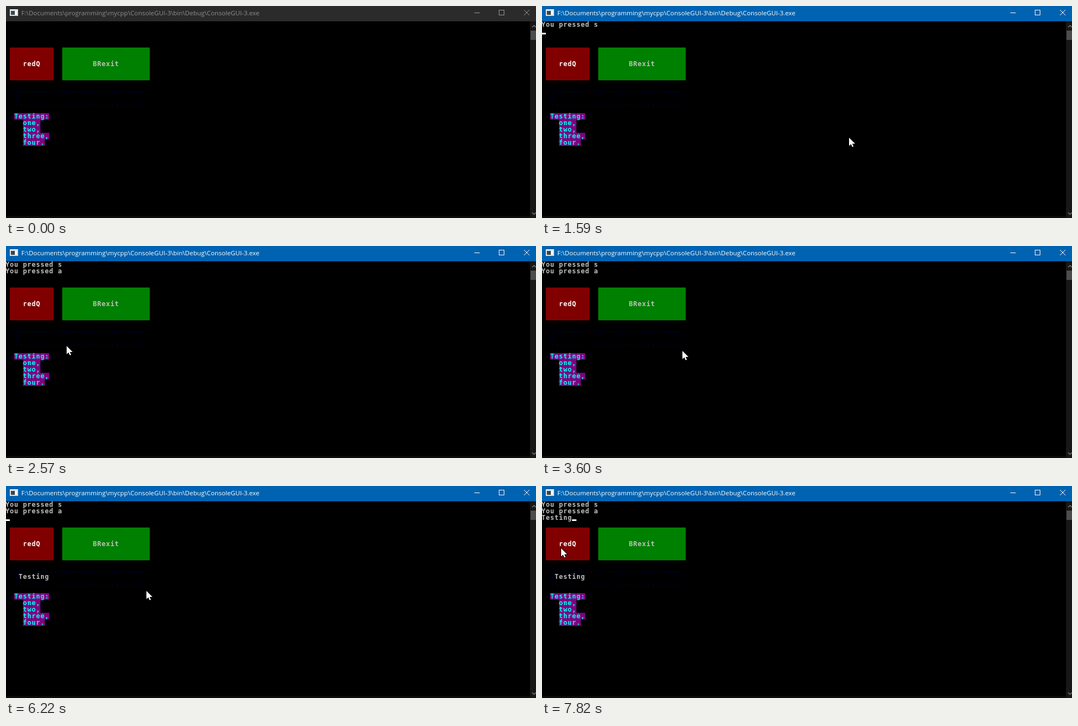
An HTML page with a canvas that plays this animation: 970x388 px, repeating every 8 s.

```html
<!DOCTYPE html>
<html lang="en">
<head>
<meta charset="utf-8">
<title>Console GUI</title>
<style>
html, body { margin: 0; width: 970px; height: 388px; overflow: hidden; background: #000; }
canvas { display: block; }
</style>
</head>
<body>
<canvas id="stage" width="970" height="388"></canvas>
<script>
const ctx = document.getElementById('stage').getContext('2d');
const LOOP = 8000;
const CELL_W = 8, CELL_H = 12;
const BLINK = 530;
const SILVER = '#c0c0c0';

const log = [
  { at: 860, text: 'You pressed s' },
  { at: 1980, text: 'You pressed a' },
  { at: 7300, text: 'Testing' }
];
const caretStart = 1440;
const typing = { from: 4700, step: 114, text: 'Testing' };

// Straight pointer moves: start, end, x, y reached
const enter = { x: 820, y: 343 };
const moves = [
  [80, 230, 597, 238], [390, 1270, 594, 238], [1440, 1590, 563, 241],
  [1590, 2170, 177, 223], [2290, 2570, 111, 183], [2570, 3070, 83, 175],
  [3410, 3600, 257, 192], [6260, 6440, 235, 202], [6440, 7000, 96, 142],
  [7060, 7460, 57, 131], [7770, 7820, 35, 114]
];

// Border dots wiped by the pointer: column, row, time
const wiped = [[11, 12, 3410], [16, 12, 6890], [14, 10, 7000], [12, 10, 7060]];

const colX = c => c * CELL_W - 1;
const rowY = r => 28 + r * CELL_H;
const clamp = v => Math.min(1, Math.max(0, v));

function box(x, y, w, h, color) {
  ctx.fillStyle = color;
  ctx.fillRect(x, y, w, h);
}

function cells(c, r, w, h, color) {
  box(colX(c), rowY(r), w * CELL_W, h * CELL_H, color);
}

function print(text, c, r, color = SILVER) {
  ctx.font = 'bold 12px "DejaVu Sans Mono", monospace';
  ctx.fillStyle = color;
  [...text].forEach((ch, i) => ctx.fillText(ch, colX(c + i), rowY(r) + 10));
}

function line(points, color, width = 1) {
  ctx.strokeStyle = color;
  ctx.lineWidth = width;
  ctx.beginPath();
  points.forEach(([x, y]) => ctx.lineTo(x, y));
  ctx.stroke();
}

function titleBar(active) {
  const ink = active ? '#fff' : '#999';
  box(0, 0, 970, 28, active ? '#0063b1' : '#2b2b2b');

  box(7, 6, 15, 12, '#f4f4f4');
  box(8, 8, 13, 9, '#c8d0d4');
  box(9, 9, 7, 7, '#39484c');
  box(17, 9, 3, 7, '#fff');

  ctx.font = '11.66px "Open Sans", sans-serif';
  ctx.fillStyle = active ? '#fff' : '#8c8c8c';
  ctx.fillText('F:\\Documents\\programming\\mycpp\\ConsoleGUI-3\\bin\\Debug\\ConsoleGUI-3.exe', 28, 17);

  box(857, 12, 10, 1, ink);
  ctx.strokeStyle = ink;
  ctx.lineWidth = 1;
  ctx.strokeRect(902.5, 7.5, 9, 9);
  line([[948, 7], [958, 17]], ink);
  line([[958, 7], [948, 17]], ink);
}

function scrollBar() {
  box(959, 28, 11, 360, '#171717');
  box(960, 45, 10, 17, '#4d4d4d');
  line([[963, 39], [966.5, 35.5], [970, 39]], '#777', 1.5);
  line([[963, 378], [966.5, 381.5], [970, 378]], '#777', 1.5);
}

function border(t) {
  const dot = (c, r) => {
    const gone = wiped.some(([wc, wr, at]) => wc === c && wr === r && t >= at);
    if (!gone) box(colX(c) + 3, rowY(r) + 9, 2, 1, '#000080');
  };
  for (let c = 2; c <= 31; c++) {
    dot(c, 10);
    dot(c, 12);
  }
  dot(2, 11);
  dot(31, 11);
}

function widgets(t) {
  cells(1, 4, 10, 5, '#800000');
  print('redQ', 4, 6, '#fff');
  cells(13, 4, 20, 5, '#008000');
  print('BRexit', 20, 6);
  border(t);
  ['Testing:', 'one,', 'two,', 'three,', 'four.'].forEach((word, i) => {
    const c = i ? 4 : 2;
    cells(c, 14 + i, word.length, 1, '#800080');
    print(word, c, 14 + i, '#0ff');
  });
}

function output(t) {
  const shown = log.filter(entry => t >= entry.at);
  shown.forEach((entry, r) => print(entry.text, 0, r));

  const typed = Math.max(0, Math.floor((t - typing.from) / typing.step) + 1);
  print(typing.text.slice(0, typed), 3, 11);

  if (t < caretStart) return;
  // Each new line restarts the blink; the last one keeps the caret at its end
  const last = shown[shown.length - 1];
  const since = t - Math.max(caretStart, last.at);
  if (Math.floor(since / BLINK) % 2) return;
  const done = shown.length === log.length;
  const c = done ? last.text.length : 0;
  const r = done ? shown.length - 1 : shown.length;
  box(colX(c), rowY(r) + 9, CELL_W, 3, '#fff');
}

function pointer(t) {
  if (t < moves[0][0]) return;
  let { x, y } = enter;
  for (const [from, to, toX, toY] of moves) {
    const k = clamp((t - from) / (to - from));
    x += (toX - x) * k;
    y += (toY - y) * k;
  }
  x = Math.round(x);
  y = Math.round(y);
  const shape = [[0, 0], [0, 15], [3.4, 11.8], [6, 17], [8.2, 16], [5.8, 11], [11, 11]];
  ctx.beginPath();
  shape.forEach(([dx, dy]) => ctx.lineTo(x + dx, y + dy));
  ctx.closePath();
  ctx.strokeStyle = '#000';
  ctx.lineWidth = 2;
  ctx.stroke();
  ctx.fillStyle = '#fff';
  ctx.fill();
}

function draw(t) {
  box(0, 0, 970, 388, '#000');
  box(0, 384, 959, 4, '#0c0c0c');
  titleBar(t >= 390);
  scrollBar();
  widgets(t);
  output(t);
  pointer(t);
}

const start = performance.now();
function tick() {
  draw((performance.now() - start) % LOOP);
  requestAnimationFrame(tick);
}
tick();
</script>
</body>
</html>
```
